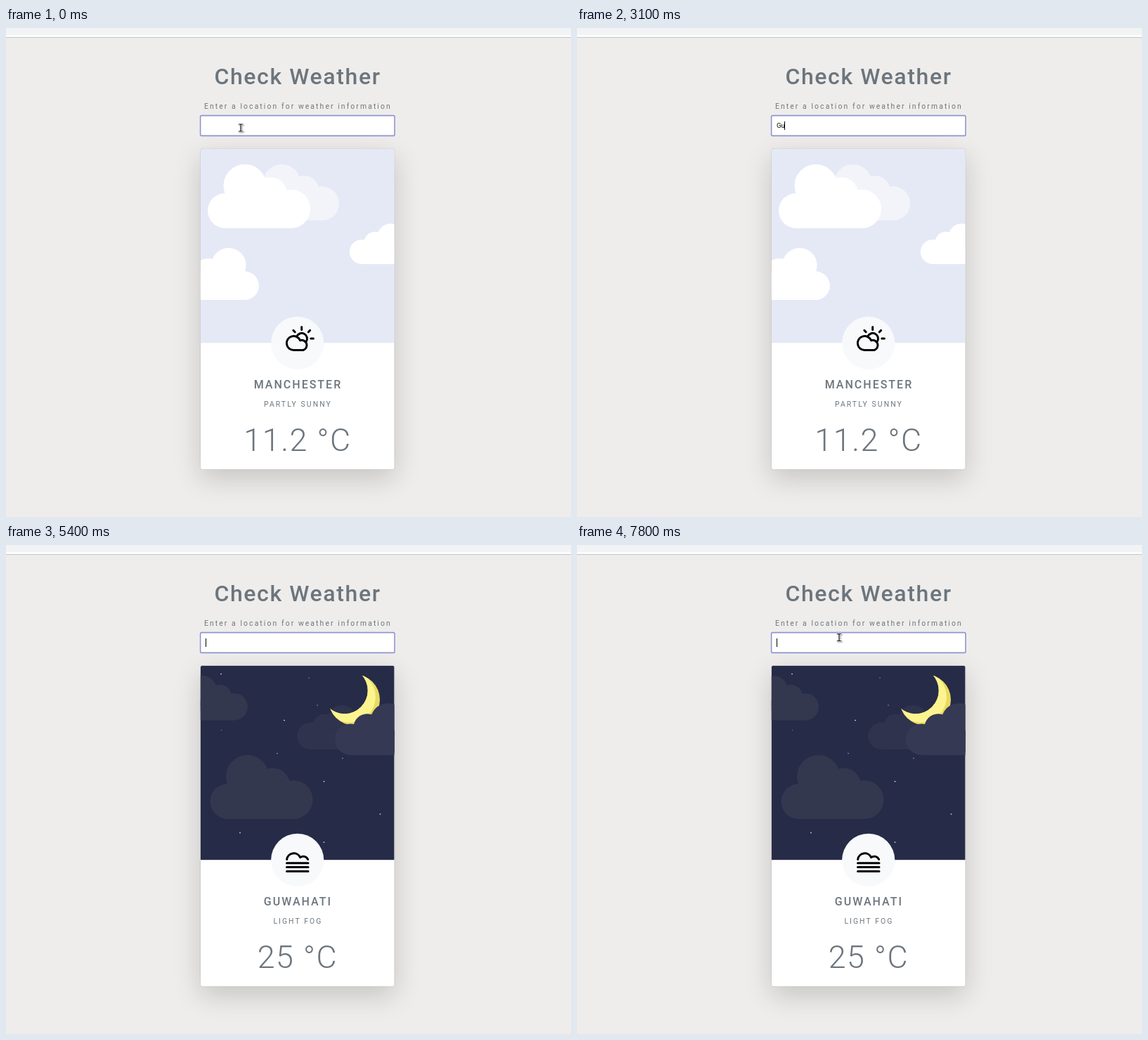
An HTML page with a canvas that plays this animation: 804 px wide and 696 px high, repeating every 8000 ms.

```html
<!DOCTYPE html>
<html lang="en">
<head>
<meta charset="utf-8">
<title>Check Weather</title>
<style>
  html, body { margin: 0; width: 100%; height: 100%; overflow: hidden; background: #eeedeb; }
  canvas, svg { position: absolute; left: 0; top: 0; width: 804px; height: 696px; }
  text { font-family: Roboto, sans-serif; fill: #6c757d; text-anchor: middle; white-space: pre; }
  #title { font-size: 32px; font-weight: 500; letter-spacing: 1.6px; }
  #label { font-size: 10.4px; letter-spacing: 2.08px; }
  #query { font-size: 9.6px; fill: #000; text-anchor: start; }
  #place { font-size: 16px; font-weight: 500; letter-spacing: 2px; }
  #sky { font-size: 10.4px; letter-spacing: 2.08px; }
  #temp { font-size: 44.8px; font-weight: 300; letter-spacing: 1.6px; }
</style>
</head>
<body>
<canvas id="stage" width="804" height="696"></canvas>
<svg viewBox="0 0 804 696">
  <text id="title" x="415" y="80">Check Weather</text>
  <text id="label" x="415.4" y="115">Enter a location for weather information</text>
  <text id="query" x="283.9" y="142.3"></text>
  <text id="place" x="415.4" y="513"></text>
  <text id="sky" x="415.4" y="538.5"></text>
  <text id="temp" x="415" y="602"></text>
</svg>
<script>
const LOOP = 8000, SEARCH_AT = 5400;
const CARD = { x: 276.8, y: 171.8, w: 275.8, h: 456.4, sky: 276.4 };
const ctx = document.getElementById('stage').getContext('2d');
const el = id => document.getElementById(id);

const typed = [[0, 0], [2900, 1], [3100, 2], [3800, 3], [4000, 4], [4300, 5],
  [4500, 6], [4600, 7], [4900, 8], [SEARCH_AT, 0]];
const caretSteps = [[0, 0], [600, 1], [1100, 0], [1700, 1], [2300, 0], [2900, 1],
  [5900, 0], [6600, 1], [7100, 0], [7700, 1]];
// time, shape, x, y
const pointer = [[0, 'beam', 334, 142], [300, 'arrow', 242, 144], [400, 'arrow', 130, 147],
  [500, 'arrow', 0, 150], [600, ''], [6600, 'arrow', 167, 515], [6700, 'arrow', 199, 514],
  [6900, 'arrow', 206.5, 496.5], [7000, 'arrow', 312, 300], [7100, 'beam', 375, 152],
  [7300, 'beam', 375, 140], [7400, 'beam', 374.5, 128], [7700, 'beam', 374, 129],
  [7800, 'beam', 373, 131.5]];
const stars = [[306, 183.5, .9], [431, 189, .4], [443, 228, .45], [396, 249.5, .95],
  [306.5, 263.5, .3], [386, 296.5, .55], [479, 303.5, .5], [452.5, 336.5, .95],
  [532.5, 383, .9], [333, 409.5, .9], [452.5, 423, .9]];

const at = (steps, t) => steps.findLast(s => s[0] <= t);

function disc(x, y, r, color) {
  ctx.fillStyle = color;
  ctx.beginPath();
  ctx.arc(x, y, r, 0, 7);
  ctx.fill();
}

function box(x, y, w, h, r) {
  ctx.beginPath();
  ctx.roundRect(x, y, w, h, r);
}

// Unit cloud is 146 x 91; flip mirrors it.
function cloud(x, y, s, color, flip) {
  ctx.save();
  ctx.translate(flip ? x + 146 * s : x, y);
  ctx.scale(flip ? -s : s, s);
  disc(25, 66, 25, color);
  disc(53, 30.5, 30.5, color);
  disc(89, 43, 24.5, color);
  disc(118.5, 63.5, 27.5, color);
  ctx.fillRect(25, 50, 93.5, 41);
  ctx.restore();
}

function daySky() {
  cloud(346, 194, .877, '#f3f4fa');
  cloud(287, 194, 1, '#fff');
  cloud(241.2, 313, .813, '#fff', true);
  cloud(488.8, 278.4, .632, '#fff', true);
}

function moon() {
  ctx.save();
  ctx.beginPath();
  ctx.rect(440, 172, 113, 100);
  ctx.arc(481.8, 207.2, 33, 0, Math.PI * 2);
  ctx.clip('evenodd');
  disc(495.6, 220.3, 36.4, '#e9d961');
  ctx.beginPath();
  ctx.arc(495.6, 220.3, 36.4, 0, 7);
  ctx.clip();
  disc(489.3, 216.2, 36.6, '#fdf48f');
  ctx.restore();
}

function nightSky() {
  for (const [x, y, a] of stars) disc(x, y, .85, `rgba(255,255,255,${a})`);
  cloud(242, 186, .698, '#34384f', false);
  cloud(290.5, 299, 1, '#34384f', false);
  cloud(414, 228, .69, '#2f334d', true);
  moon();
  cloud(468, 225.3, .81, '#353953', true);
}

const icons = {
  day: new Path2D(`M409.5 458.5 A10 10 0 1 1 418.6 444.7 A7.2 7.2 0 1 1 423 458.5 Z
    M414 438.5 A7.4 7.4 0 1 1 427.6 445.6
    M420.7 425.6V429.4 M408.9 430.4L411.2 432.7 M432.6 430.4L430.3 432.7 M433.8 442H437.4`),
  fog: new Path2D(`M399.6 447.5 A10 10 0 0 1 418.6 444.7 A7.2 7.2 0 0 1 429.6 447.5
    M399.5 452.7H430 M399.5 458.6H430 M399.5 464.5H430`)
};

function card(night) {
  const { x, y, w, h, sky } = CARD;
  ctx.save();
  ctx.shadowColor = 'rgba(0,0,0,.175)';
  ctx.shadowBlur = 38.4;
  ctx.shadowOffsetY = 12.8;
  ctx.fillStyle = '#fff';
  box(x, y, w, h, 3);
  ctx.fill();
  ctx.restore();

  ctx.save();
  box(x, y, w, h, 3);
  ctx.clip();
  ctx.fillStyle = night ? '#262b47' : '#e5e9f6';
  ctx.fillRect(x, y, w, sky);
  night ? nightSky() : daySky();
  ctx.restore();
  ctx.lineWidth = .8;
  ctx.strokeStyle = 'rgba(0,0,0,.1)';
  box(x - .3, y - .3, w + .6, h + .6, 3.2);
  ctx.stroke();

  disc(414.7, 448.3, 37.6, '#f8f9fb');
  ctx.lineWidth = 3;
  ctx.lineCap = ctx.lineJoin = 'round';
  ctx.strokeStyle = '#000';
  ctx.stroke(night ? icons.fog : icons.day);
}

function page() {
  ctx.fillStyle = '#eeedeb';
  ctx.fillRect(0, 0, 804, 696);
  ctx.fillStyle = '#f1f3f4';
  ctx.fillRect(0, 0, 804, 10);
  ctx.fillStyle = '#fcfcfc';
  ctx.fillRect(0, 10, 804, 3);
  ctx.fillStyle = '#c3c5c7';
  ctx.fillRect(0, 13, 804, 1);
}

function field(text, caret) {
  ctx.fillStyle = '#fff';
  ctx.strokeStyle = '#8f94d3';
  ctx.lineWidth = 1.6;
  box(276.6, 124.6, 276.4, 28.8, 2);
  ctx.fill();
  ctx.stroke();
  if (!caret) return;
  ctx.font = '9.6px Roboto, sans-serif';
  ctx.fillStyle = '#000';
  ctx.fillRect(Math.floor(284 + ctx.measureText(text).width - .1 * !!text), 133, 1, 12);
}

const shapes = {
  beam: new Path2D('M-2.6 -5H-.8L0 -4.4L.8 -5H2.6 M0 -4.4V4.4 M-2.6 5H-.8L0 4.4L.8 5H2.6'),
  arrow: new Path2D('M0 0V12L2.7 9.5L4.7 14L6.6 13.2L4.6 8.8H8.4Z')
};

function cursor([, kind, x, y]) {
  if (!kind) return;
  ctx.save();
  ctx.translate(x, y);
  ctx.strokeStyle = '#fff';
  ctx.lineWidth = kind === 'beam' ? 2.6 : 1.8;
  ctx.shadowColor = 'rgba(0,0,0,.4)';
  ctx.shadowBlur = 2;
  ctx.shadowOffsetX = ctx.shadowOffsetY = 1;
  ctx.stroke(shapes[kind]);
  ctx.shadowColor = 'transparent';
  ctx.fillStyle = ctx.strokeStyle = '#111';
  ctx.lineWidth = 1.2;
  kind === 'beam' ? ctx.stroke(shapes.beam) : ctx.fill(shapes.arrow);
  ctx.restore();
}

function setText(values) {
  for (const id in values) {
    if (el(id).textContent !== values[id]) el(id).textContent = values[id];
  }
}

function draw(now) {
  const t = now % LOOP, night = t >= SEARCH_AT;
  const query = 'Guwahati'.slice(0, at(typed, t)[1]);
  setText(night
    ? { query, place: 'GUWAHATI', sky: 'LIGHT FOG', temp: '25 °C' }
    : { query, place: 'MANCHESTER', sky: 'PARTLY SUNNY', temp: '11.2 °C' });
  page();
  field(query, at(caretSteps, t)[1]);
  card(night);
  cursor(at(pointer, t));
}

const start = performance.now();
function tick() {
  draw(performance.now() - start);
  requestAnimationFrame(tick);
}
tick();
</script>
</body>
</html>
```
